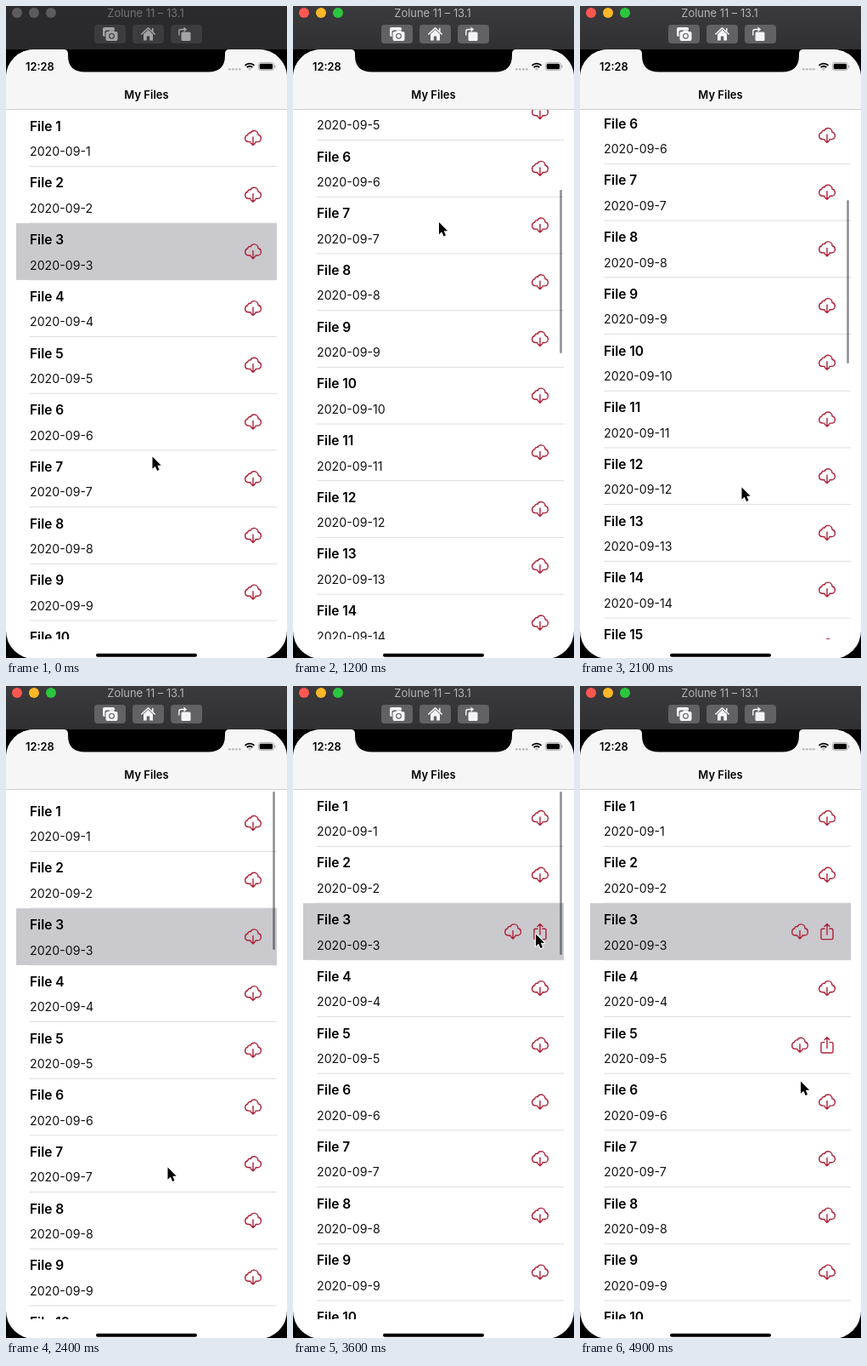
Write an HTML page with a canvas that moves like this. It is 331 px wide and 766 px high and loops after 5000 ms.

```html
<!DOCTYPE html>
<html lang="en">
<head>
<meta charset="utf-8">
<title>My Files</title>
<style>
  html, body { margin: 0; width: 100%; height: 100%; overflow: hidden; background: #000; }
  canvas { display: block; width: 331px; height: 766px; }
</style>
</head>
<body>
<canvas id="stage"></canvas>
<script>
const W = 331, H = 766, LOOP = 5000, STEP = 100;
const LIST_TOP = 122, LIST_BOTTOM = 744, ROW = 66.7, ROWS = 30;
const RED = '#ad2036';
const canvas = document.getElementById('stage');
const ctx = canvas.getContext('2d');
const dpr = window.devicePixelRatio || 1;
canvas.width = W * dpr;
canvas.height = H * dpr;

// [time, x, y]
const pointerKeys = [
  [0, 172.5, 529.5], [100, 172.5, 529.5], [600, 178, 500], [900, 178.5, 482.5],
  [950, 178.5, 482.5], [1150, 172, 254], [1800, 171.5, 253.5], [1850, 171.5, 253.5],
  [2050, 190.5, 565.5], [2600, 190.5, 565.5], [2800, 310.5, 276.5], [3000, 298, 286],
  [3200, 286, 290], [3300, 286, 291.5], [3800, 286, 291.5], [4300, 286, 420],
  [4600, 286, 422], [4900, 260, 464.5]
];
// [time, offset] once the first flick has slowed down
const returnKeys = [
  [1850, 757], [2050, 436], [2100, 336.5], [2200, 160], [2300, 36], [2400, -6],
  [2600, -6], [2700, -4], [2800, -2], [2900, 0]
];

const cloud = new Path2D(
  'M-3 4.6H-5C-7.6 4.6-9.3 2.8-9.3.6C-9.3-1.4-8-3-6.3-3.4C-6.2-5.3-4.4-6.4-2.9-5.7' +
  'C-2.1-7.6-.5-8.5 1.2-8.5C4-8.5 6-6.3 6.1-3.6C8-3.2 9.4-1.6 9.4.5C9.4 2.8 7.7 4.6 5.4 4.6H3' +
  'M0-1V8.4M-2.8 5.7L0 8.5L2.8 5.7');
const share = new Path2D(
  'M-3-3.4H-5.6Q-7-3.4-7-2V7.6Q-7 9-5.6 9H5.6Q7 9 7 7.6V-2Q7-3.4 5.6-3.4H3' +
  'M0 3.4V-9M-3-6.2L0-9.2L3-6.2');
const arrow = new Path2D('M0 0V14.2L3.3 11.2L5.6 16.6L8 15.6L5.8 10.3H10.2Z');
const notch = new Path2D(
  'M68 51Q73 51 73 56V58Q73 77.5 93 77.5H238Q258 77.5 258 58V56Q258 51 263 51Z');

function sample(keys, t) {
  let i = 1;
  while (i < keys.length - 1 && t > keys[i][0]) i++;
  const a = keys[i - 1], b = keys[i];
  const u = Math.min(1, Math.max(0, (t - a[0]) / (b[0] - a[0])));
  return a.slice(1).map((v, k) => v + (b[k + 1] - v) * u);
}

function scrollAt(t) {
  if (t < 950) return 0;
  if (t < 1150) return 230 * (t - 950) / 200;
  if (t < 1850) return 230 + 711 * (1 - Math.exp(-(t - 1150) / 500));
  return sample(returnKeys, t)[0];
}

function rect(x, y, w, h, color) {
  ctx.fillStyle = color;
  ctx.fillRect(x, y, w, h);
}

function pill(x, y, w, h, r, color) {
  ctx.fillStyle = color;
  ctx.beginPath();
  ctx.roundRect(x, y, w, h, r);
  ctx.fill();
}

function dot(x, y, r, color) {
  ctx.fillStyle = color;
  ctx.beginPath();
  ctx.arc(x, y, r, 0, Math.PI * 2);
  ctx.fill();
}

function text(str, x, y, size, weight, color = '#000', align = 'left') {
  ctx.font = `${weight} ${size}px Inter, "Liberation Sans", sans-serif`;
  ctx.textAlign = align;
  ctx.fillStyle = color;
  ctx.fillText(str, x, y);
}

function icon(path, x, y) {
  ctx.save();
  ctx.translate(x, y);
  ctx.strokeStyle = RED;
  ctx.lineWidth = 1.4;
  ctx.lineCap = ctx.lineJoin = 'round';
  ctx.stroke(path);
  ctx.restore();
}

function drawToolIcons(color, back) {
  // camera stack
  pill(114, 25, 14, 11, 2, color);
  pill(116.5, 28.5, 15.5, 13, 2, back);
  pill(117.5, 30, 14, 11, 2, color);
  pill(121.5, 28.5, 6, 4, 1, color);
  dot(124.5, 35.3, 3.4, back);
  dot(124.5, 35.3, 2.2, color);
  // house
  ctx.strokeStyle = ctx.fillStyle = color;
  ctx.lineWidth = 1.6;
  ctx.lineCap = ctx.lineJoin = 'round';
  ctx.stroke(new Path2D('M159.8 33L167.5 25.8L175.2 33M172.8 26.5V30'));
  ctx.fill(new Path2D('M162 33L167.5 28L173 33V40.5H169.2V35.5H165.8V40.5H162Z'));
  // rotate
  pill(206.5, 30.5, 11, 10.5, 1.5, color);
  ctx.strokeStyle = color;
  ctx.lineWidth = 1.4;
  ctx.stroke(new Path2D('M203.8 34V30Q203.8 27.5 206.3 27.5H210'));
  ctx.fill(new Path2D('M209.5 24.5L213.2 27.5L209.5 30.5Z'));
}

function drawWindowBar(active) {
  const shade = ctx.createLinearGradient(0, 0, 0, 51);
  shade.addColorStop(0, active ? '#3b3a3d' : '#2b2a2d');
  shade.addColorStop(1, active ? '#302f32' : '#29282b');
  rect(0, 0, W, 51, shade);
  const lights = active ? ['#fc5650', '#fdb827', '#2ac63e'] : Array(3).fill('#5c5b5e');
  lights.forEach((c, i) => dot(13 + 20 * i, 8, 6, c));
  text('Zolune 11 – 13.1', 164.5, 13, 12.9, 400, active ? '#b5b4b7' : '#737275', 'center');
  const back = active ? '#626164' : '#3c3b3e';
  for (let i = 0; i < 3; i++) pill(104 + 45 * i, 22, 37, 22, 4, back);
  drawToolIcons(active ? '#f4f4f5' : '#a3a2a5', back);
}

function drawStatus() {
  text('12:28', 23, 75.7, 12.8, 600);
  for (let i = 0; i < 4; i++) dot(263.3 + 4 * i, 74.3, 1.4, '#bcbcbd');
  // wifi
  ctx.strokeStyle = '#000';
  ctx.lineWidth = 1.9;
  ctx.lineCap = 'butt';
  for (const r of [4.7, 7.8]) {
    ctx.beginPath();
    ctx.arc(287, 75.4, r, Math.PI * 1.25, Math.PI * 1.75);
    ctx.stroke();
  }
  ctx.fill(new Path2D('M287 76L284.9 73.7Q287 72 289.1 73.7Z'));
  // battery
  ctx.strokeStyle = '#a0a0a1';
  ctx.lineWidth = 0.8;
  ctx.beginPath();
  ctx.roundRect(297.4, 66.4, 18, 9.2, 2.5);
  ctx.stroke();
  pill(298.7, 67.7, 15.4, 6.6, 1.5, '#000');
  pill(316.3, 69.4, 1.2, 3.2, 0.6, '#a0a0a1');
}

function drawRow(n, y, shared) {
  rect(28, y + ROW - 0.6, 291, 1, '#dddde0');
  if (n === 3) rect(12, y, 307, ROW, '#cac9ce');
  text(`File ${n}`, 28, y + 24.9, 15.5, 600);
  text(`2020-09-${n}`, 28, y + 54.4, 14.2, 400, '#111');
  const mid = y + 33.2;
  if (shared) icon(share, 291, mid + 0.2);
  icon(cloud, shared ? 259 : 291, mid);
}

function drawList(t, scroll) {
  ctx.save();
  ctx.beginPath();
  ctx.rect(0, LIST_TOP, W, LIST_BOTTOM - LIST_TOP);
  ctx.clip();
  for (let n = 1; n <= ROWS; n++) {
    const y = 121.8 + (n - 1) * ROW - scroll;
    if (y < LIST_TOP - ROW - 1 || y > LIST_BOTTOM) continue;
    drawRow(n, y, n === 3 && t >= 3400 || n === 5 && t >= 4600);
  }
  if (t >= 1000 && t < 4600) {
    const top = 124 + Math.max(0, scroll) * 0.3087;
    pill(314.3, top, 2.5, 192 + Math.min(0, scroll), 1.25, 'rgba(0,0,0,.45)');
  }
  ctx.restore();
}

function drawPhone(t) {
  rect(0, 51, W, H - 51, '#000');
  ctx.save();
  ctx.beginPath();
  ctx.roundRect(0, 51, W, 716, 33);
  ctx.clip();
  rect(0, 51, W, 716, '#fff');
  rect(0, 51, W, 71, '#f6f6f6');
  rect(0, 121, W, 1, '#cfcfcf');
  ctx.fillStyle = '#000';
  ctx.fill(notch);
  drawStatus();
  text('My Files', 165.5, 108.7, 13, 600, '#000', 'center');
  drawList(t, scrollAt(t));
  pill(106, 760.8, 119, 4, 2, '#000');
  ctx.restore();
}

function drawPointer(t) {
  const [x, y] = sample(pointerKeys, t);
  ctx.save();
  ctx.translate(x, y);
  ctx.lineJoin = 'round';
  ctx.strokeStyle = '#fff';
  ctx.lineWidth = 2.2;
  ctx.stroke(arrow);
  ctx.fillStyle = '#000';
  ctx.fill(arrow);
  ctx.restore();
}

function frame(now) {
  const t = Math.floor((now % LOOP) / STEP) * STEP;
  ctx.setTransform(dpr, 0, 0, dpr, 0, 0);
  drawWindowBar(t >= 800);
  drawPhone(t);
  drawPointer(t);
  requestAnimationFrame(frame);
}

frame(performance.now());
</script>
</body>
</html>
```
